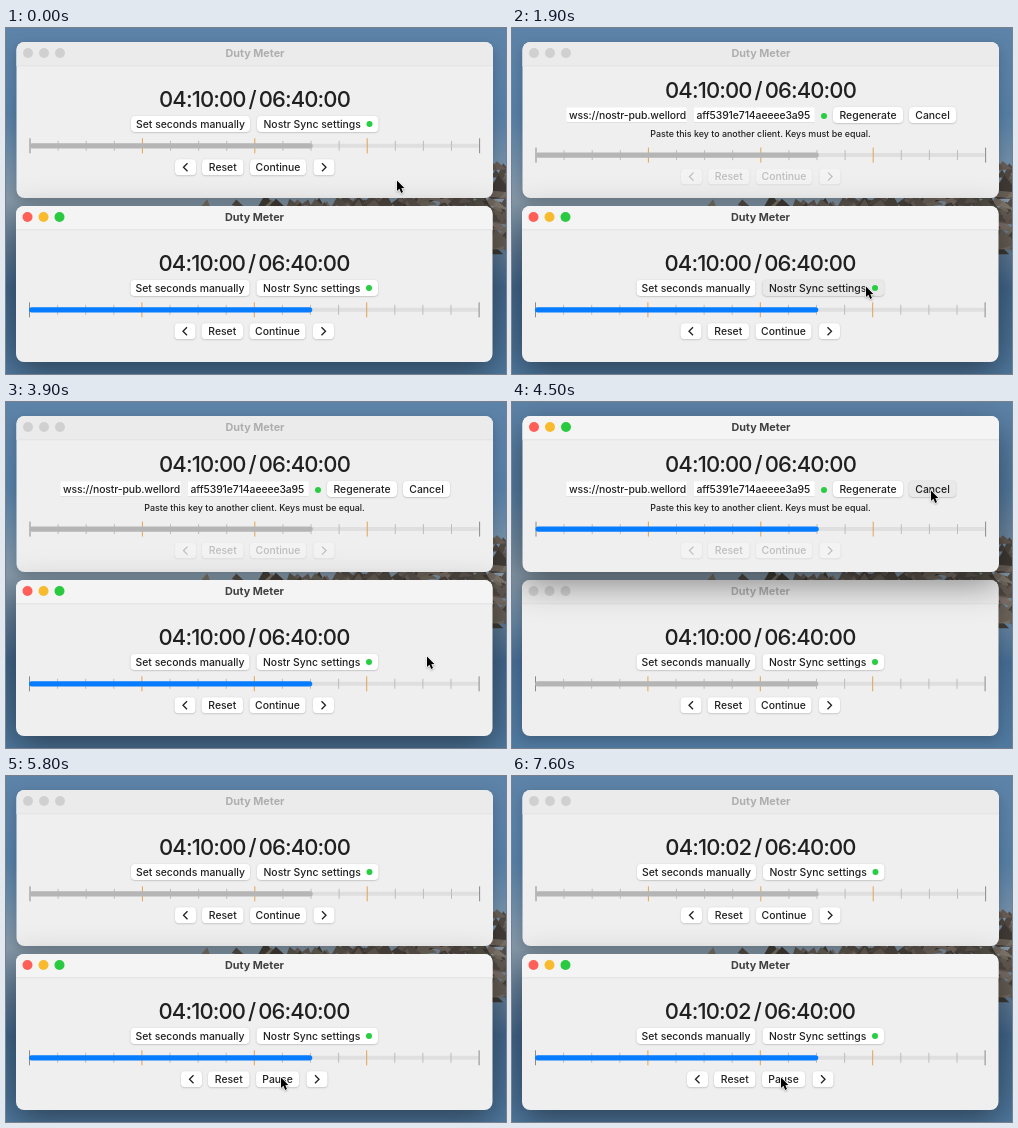
Write an HTML page with a canvas that moves like this. It is 500 px wide and 346 px high and loops after 8 s.

```html
<!DOCTYPE html>
<html lang="en">
<head>
<meta charset="utf-8">
<title>Duty Meter</title>
<style>
html, body { margin: 0; width: 100%; height: 100%; overflow: hidden; background: #58799a; }
canvas { display: block; width: 500px; height: 346px; }
</style>
</head>
<body>
<canvas id="stage"></canvas>
<script>
const W = 500, H = 346, LOOP = 8000, STEP = 100;
const FONT = 'Inter, "Open Sans", sans-serif';
const INK = '#202020', GREEN = '#28cd41';
const canvas = document.getElementById('stage');
const ctx = canvas.getContext('2d');
const ratio = window.devicePixelRatio || 1;
canvas.width = W * ratio;
canvas.height = H * ratio;

const within = (t, a, b) => t >= a && t < b;
const clamp = v => Math.min(1, Math.max(0, v));
const ease = u => u * u * (3 - 2 * u);

// Each move eases the pointer to a control it will click.
const home = { x: 391, y: 152 };
const moves = [
  { from: 0, to: 300, x: 350, y: 96 },
  { from: 800, to: 1300, x: 354, y: 258 },
  { from: 2400, to: 3100, x: 421, y: 254 },
  { from: 3900, to: 4200, x: 419, y: 88 },
  { from: 4600, to: 5300, x: 275, y: 301 },
  { from: 6600, to: 7200, x: 269, y: 301 }
];

function pointerAt(t) {
  return moves.reduce((p, m) => {
    const e = ease(clamp((t - m.from) / (m.to - m.from)));
    return { x: p.x + (m.x - p.x) * e, y: p.y + (m.y - p.y) * e };
  }, home);
}

const elapsed = (t, started) => Math.max(0, Math.floor((t - started) / 1000));

function stateAt(t) {
  const topActive = within(t, 400, 1900) || within(t, 4500, 5500);
  return {
    topActive,
    top: {
      active: topActive,
      settings: within(t, 500, 4600),
      seconds: elapsed(t, 5600),
      pressed: within(t, 400, 500) ? 'sync' : within(t, 4500, 4600) ? 'cancel' : ''
    },
    bottom: {
      active: !topActive,
      settings: within(t, 2000, 3900),
      seconds: elapsed(t, 5500),
      running: t >= 5600,
      pressed: within(t, 1900, 2000) ? 'sync' : within(t, 5500, 5600) ? 'toggle' : ''
    }
  };
}

function shadow(color, blur, drop) {
  ctx.shadowColor = color;
  ctx.shadowBlur = blur * ratio;
  ctx.shadowOffsetY = drop * ratio;
}

function box(x, y, w, h, r, fill) {
  ctx.beginPath();
  ctx.roundRect(x, y, w, h, r);
  ctx.fillStyle = fill;
  ctx.fill();
}

function dot(x, y, r, fill) {
  ctx.beginPath();
  ctx.arc(x, y, r, 0, 7);
  ctx.fillStyle = fill;
  ctx.fill();
}

function text(str, x, y, size, color, { weight = 450, align = 'center', spacing = 0, gap = 0 } = {}) {
  ctx.font = `${weight} ${size}px ${FONT}`;
  ctx.letterSpacing = spacing + 'px';
  ctx.wordSpacing = gap + 'px';
  ctx.textAlign = align;
  ctx.fillStyle = color;
  ctx.fillText(str, x, y);
}

function randomFrom(seed) {
  return () => (seed = (seed * 16807) % 2147483647) / 2147483647;
}

function backdrop() {
  const sky = ctx.createLinearGradient(0, 0, 0, H);
  ['#5d83a8', '#557da3', '#8598a8', '#44698f', '#50799f']
    .forEach((c, i) => sky.addColorStop(i / 4, c));
  ctx.fillStyle = sky;
  ctx.fillRect(0, 0, W, H);

  // Rocky shore, rising to the right
  const rnd = randomFrom(41);
  for (let i = 0; i < 260; i++) {
    const x = 190 + 320 * Math.sqrt(rnd());
    const rise = clamp((x - 400) / 100);
    const y = 174 - 45 * rise + rnd() * (16 + 80 * rise);
    const size = 5 + rnd() * 8;
    const light = 22 + rnd() * 26;
    ctx.fillStyle = `hsl(${20 + rnd() * 20} 9% ${light}%)`;
    ctx.beginPath();
    ctx.moveTo(x - size, y + size * rnd());
    ctx.lineTo(x + size * (rnd() - 0.5), y - size * 0.7);
    ctx.lineTo(x + size, y + size * rnd());
    ctx.fill();
  }
}

function button(label, x, w, y, { pressed, off } = {}) {
  ctx.save();
  shadow(`rgba(0,0,0,${off ? 0.12 : 0.27})`, 1.5, 0.5);
  box(x, y - 8, w, 16, 4, pressed ? '#e9e9e9' : off ? '#f3f3f3' : '#ffffff');
  ctx.restore();
  const color = off ? '#bebebe' : INK;
  if (label === '<' || label === '>') {
    const c = x + w / 2, d = label === '<' ? 2 : -2;
    ctx.beginPath();
    ctx.moveTo(c + d, y - 4);
    ctx.lineTo(c - d, y);
    ctx.lineTo(c + d, y + 4);
    ctx.strokeStyle = color;
    ctx.lineWidth = 1.3;
    ctx.stroke();
  } else {
    text(label, x + w / 2, y + 3.6, 10.4, color);
  }
}

function slider(y, active) {
  box(24, y - 2, 449.5, 4, 2, '#dfdfdf');
  for (let i = 0; i <= 16; i++) {
    const end = i % 16 === 0, hour = i % 4 === 0;
    const h = hour ? 7.5 : 5;
    ctx.fillStyle = end ? '#8a8a8a' : hour ? '#e0a455' : '#bdbdbd';
    ctx.fillRect(23.5 + i * 28.1, y - h, 1, h * 2);
  }
  box(23.5, y - 2.6, 283.3, 5.2, 2.6, active ? '#087cff' : '#b5b5b5');
}

function field(str, x, w, y) {
  ctx.save();
  box(x, y - 7.5, w, 15, 0, '#ffffff');
  ctx.fillStyle = '#d2d2d2';
  ctx.fillRect(x, y + 7, w, 0.6);
  ctx.beginPath();
  ctx.rect(x, y - 8, w - 0.5, 16);
  ctx.clip();
  text(str, x + 2.5, y + 3.6, 10.4, INK, { align: 'left', spacing: -0.1 });
  ctx.restore();
}

function panel(x, y, s) {
  ctx.save();
  ctx.translate(x, y);

  ctx.save();
  if (s.active) shadow('rgba(0,0,0,.45)', 34, 11);
  else shadow('rgba(0,0,0,.2)', 12, 4);
  box(10.5, 14, 476.5, 156, 8, '#efefef');
  ctx.restore();
  box(10.5, 14, 476.5, 24, [8, 8, 0, 0], s.active ? '#f4f4f5' : '#ebebec');
  ctx.fillStyle = s.active ? '#d9d9d9' : '#e0e0e0';
  ctx.fillRect(10.5, 37.5, 476.5, 0.7);

  ['#ff5f57', '#f8bb2e', '#29c940']
    .forEach((c, i) => dot(22 + i * 16, 25, 5, s.active ? c : '#d0d0d0'));
  text('Duty Meter', 249, 28.6, 10.8, s.active ? '#414141' : '#aeaeae', { weight: 700 });

  const clock = `04:10:0${s.seconds} / 06:40:00`;
  text(clock, 248.5, s.settings ? 69.6 : 79.3, 22, INK, { spacing: -0.9, gap: -2 });

  if (s.settings) {
    field('wss://nostr-pub.wellorder.net', 54.5, 120, 87);
    field('aff5391e714aeeee3a95', 182, 120.5, 87);
    dot(312, 88, 3, GREEN);
    button('Regenerate', 321, 70, 87);
    button('Cancel', 397, 47, 87, { pressed: s.pressed === 'cancel' });
    text('Paste this key to another client. Keys must be equal.', 248.5, 109.3, 8.9, INK);
  } else {
    button('Set seconds manually', 125, 119, 96);
    button('', 251, 121.5, 96, { pressed: s.pressed === 'sync' });
    text('Nostr Sync settings', 257.5, 99.6, 10.4, INK, { align: 'left' });
    dot(363.5, 96, 3, GREEN);
  }

  const off = s.settings, drop = off ? 9.3 : 0;
  const row = 139.3 + drop, shift = s.running ? 6.5 : 0;
  slider(117.8 + drop, s.active);
  button('<', 169 + shift, 21, row, { off });
  button('Reset', 196 + shift, 41.5, row, { off });
  button(s.running ? 'Pause' : 'Continue', 244 + shift, 56 - 2 * shift, row,
    { off, pressed: s.pressed === 'toggle' });
  button('>', 307.5 - shift, 21, row, { off });
  ctx.restore();
}

function pointer({ x, y }) {
  ctx.save();
  ctx.translate(x, y + 0.5);
  shadow('rgba(0,0,0,.3)', 2, 1);
  ctx.beginPath();
  [[0, 0], [0, 10.5], [2.4, 8.3], [4.2, 12.4], [6, 11.6], [4.3, 7.7], [7.4, 7.5]]
    .forEach(p => ctx.lineTo(...p));
  ctx.closePath();
  ctx.lineJoin = 'round';
  ctx.lineWidth = 1.3;
  ctx.strokeStyle = '#ffffff';
  ctx.stroke();
  ctx.shadowColor = 'transparent';
  ctx.fillStyle = '#000000';
  ctx.fill();
  ctx.restore();
}

function draw(t) {
  const s = stateAt(t);
  ctx.setTransform(ratio, 0, 0, ratio, 0, 0);
  backdrop();
  const top = () => panel(0, 0, s.top);
  const bottom = () => panel(-0.5, 164, s.bottom);
  (s.topActive ? [bottom, top] : [top, bottom]).forEach(paint => paint());
  pointer(pointerAt(t));
}

const start = performance.now();
function tick() {
  const t = (performance.now() - start) % LOOP;
  draw(Math.floor(t / STEP) * STEP);
  requestAnimationFrame(tick);
}
tick();
</script>
</body>
</html>
```
